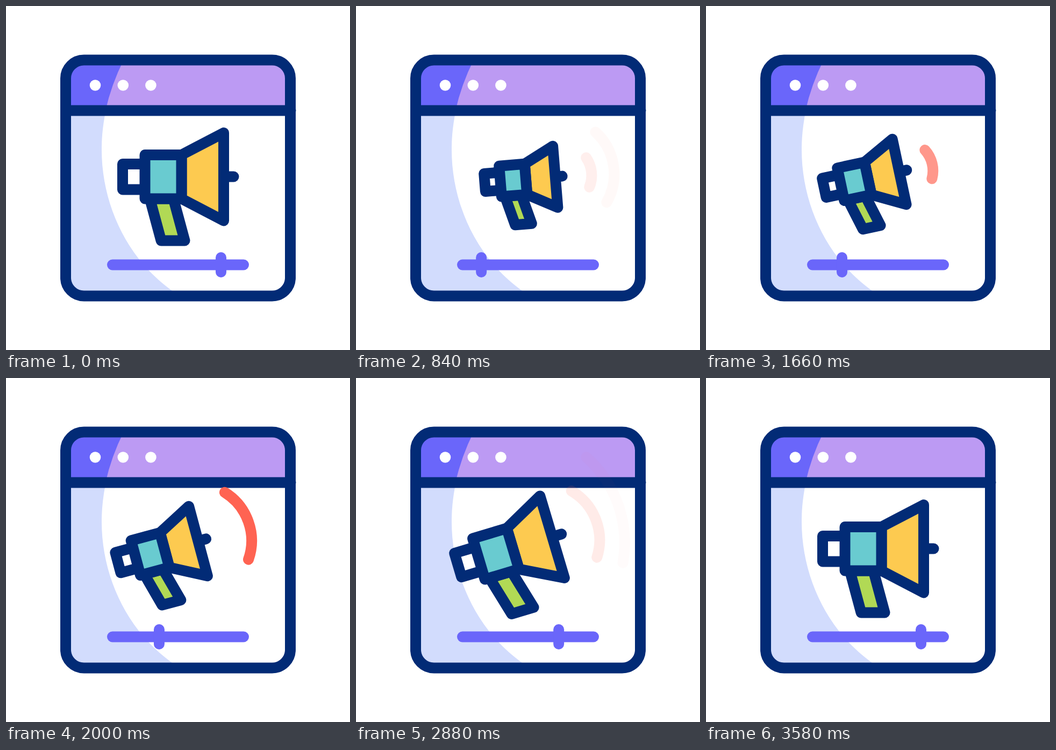
Recreate the animation shown at these times as an HTML page. Size 640 px wide and 640 px high, loop 3600 ms.

```html
<!DOCTYPE html>
<html lang="en">
<head>
<meta charset="utf-8">
<title>Megaphone window</title>
<style>
  html, body { margin: 0; width: 100%; height: 100%; overflow: hidden; background: #fff; }
  svg { display: block; width: 640px; height: 640px; }
  .ink { stroke: #022b76; }
  .ink, .wave, .slider { stroke-width: 20; stroke-linecap: round; stroke-linejoin: round; }
  .wave { fill: none; stroke: #ff6250; opacity: 0; }
  .slider { stroke: #6a66fa; }
  #horn path { vector-effect: non-scaling-stroke; }
</style>
</head>
<body>
<svg viewBox="0 0 640 640">
  <clipPath id="pane"><rect x="111" y="100.5" width="418" height="439" rx="34"/></clipPath>
  <g id="win">
    <g clip-path="url(#pane)">
      <path fill="#fff" d="M111 100H529V540H111z"/>
      <path fill="#d2dcfd" d="M111 100H219C191 155 178 215 178 267C178 370 226 470 308 529L322 540H111z"/>
      <path fill="#bc9af3" d="M111 100H529V195H111z"/>
      <path fill="#6a66fa" d="M111 100H219Q196 146 185 195H111z"/>
    </g>
    <g fill="#fff">
      <circle cx="166" cy="147.5" r="10.3"/>
      <circle cx="217.8" cy="147.5" r="10.3"/>
      <circle cx="269.4" cy="147.5" r="10.3"/>
    </g>
    <path class="ink" d="M112 194.5H529.5"/>
    <rect class="ink" fill="none" x="111" y="100.5" width="418" height="439" rx="34"/>
    <path class="slider" d="M198 481.5H442"/>
    <path class="slider" id="knob" d="M0 468V495"/>
    <g id="aim">
      <path class="wave" d="M440.2 292.5A58 58 0 0 1 441.8 347.5"/>
      <path class="wave" d="M461.4 246.4A105.7 105.7 0 0 1 471.6 378.4"/>
      <path class="wave" d="M506 194A214 214 0 0 1 515 402"/>
      <g id="horn" class="ink">
        <path fill="#fff" d="M258 294H217V341.5H258"/>
        <path d="M405 317.5H423.5"/>
        <path fill="#b1d955" d="M267.6 358.5L288.6 436.5H332.5L311.4 358.5z"/>
        <path fill="#fdca50" d="M326.5 277L405 236V399.5L326.5 358.5z"/>
        <path fill="#69cbd0" d="M258.5 277H326.5V358.5H258.5z"/>
      </g>
    </g>
  </g>
</svg>
<script>
const LOOP = 3600, START = 220, BEAT = 280, BEATS = 12;
const $ = id => document.getElementById(id);
const waves = document.querySelectorAll('.wave');

const sine = x => (1 - Math.cos(Math.PI * x)) / 2;
const linear = x => x;

// Value at time t through [time, value] keys, eased between each pair
function track(t, keys, ease = sine) {
  if (t <= keys[0][0]) return keys[0][1];
  for (let i = 1; i < keys.length; i++) {
    const [t0, v0] = keys[i - 1], [t1, v1] = keys[i];
    if (t < t1) return v0 + (v1 - v0) * ease((t - t0) / (t1 - t0));
  }
  return keys[keys.length - 1][1];
}

const knobX = [[START, 400], [900, 230], [1100, 230], [3440, 400]];
const size = [[START, 1], [845, .7], [960, .7], [3340, 1]];
const lean = [[START, 0], [840, -9.6], [1660, -16.8], [2000, -17.6], [2540, -14.2], [3140, -15.3], [3440, 0]];
const nodAmount = [[START, 0], [760, 5], [3240, 5], [3440, 0]];
const knock = [[2920, 0], [3250, 1], [3440, 0]];

// Opacity of each wave within one beat
const pulses = [
  [[0, .1], [25, 1], [40, .69], [60, .12], [66, 0]],
  [[60, 0], [80, .8], [100, 1], [120, .8], [145, 0]],
  [[140, 0], [180, 1], [215, .8], [275, 0]]
];

function draw(t) {
  const beat = (t - START) / BEAT;
  const live = beat >= 0 && beat < BEATS;
  const phase = live ? (beat % 1) * BEAT : 0;

  const k = track(t, knock);
  $('win').setAttribute('transform',
    `translate(${-29.5 * k} ${-43.7 * k}) rotate(${-5.55 * k} 320 320)`);

  $('knob').setAttribute('transform', `translate(${track(t, knobX)} 0)`);

  const nod = track(t, nodAmount) * Math.cos(2 * Math.PI * (phase - 55) / BEAT);
  $('aim').setAttribute('transform', `rotate(${track(t, lean) + nod} 307 436)`);

  const s = track(t, size);
  $('horn').setAttribute('transform',
    `translate(322 336.5) scale(${s}) translate(-322 -336.5)`);

  waves.forEach((w, i) => {
    w.style.opacity = live ? track(phase, pulses[i], linear) : 0;
  });
}

const begin = performance.now();
function tick() {
  draw((performance.now() - begin) % LOOP);
  requestAnimationFrame(tick);
}
tick();
</script>
</body>
</html>
```
